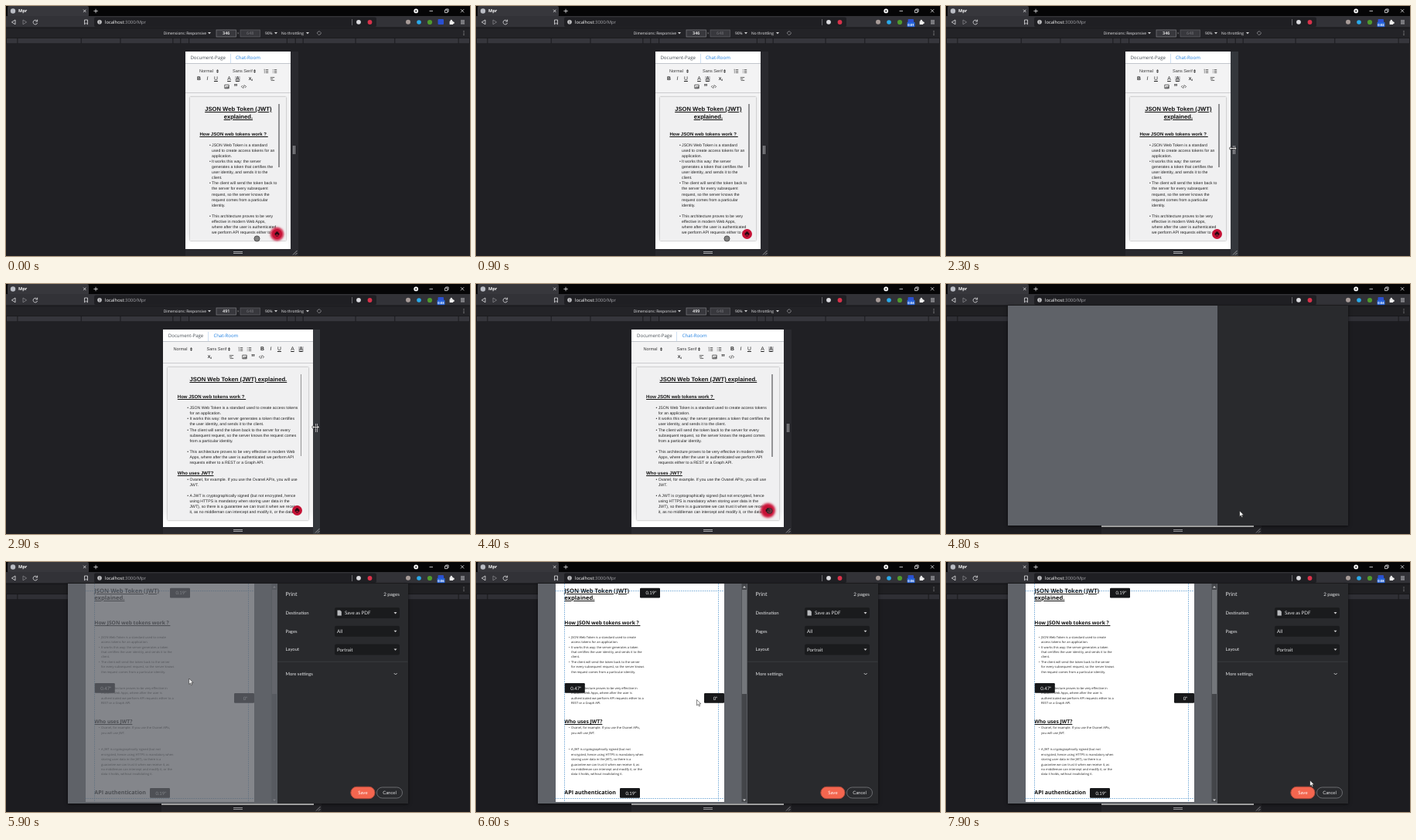
These frames come from a looping animation (600x324 px, 8000 ms). An HTML page:

```html
<!DOCTYPE html>
<html lang="en">
<head>
<meta charset="utf-8">
<title>Document editor</title>
<style>
html, body { margin: 0; width: 100%; height: 100%; overflow: hidden; background: #202024; }
#stage { position: relative; width: 600px; height: 324px; overflow: hidden; background: #202024;
  font-family: "Open Sans", sans-serif; text-rendering: geometricPrecision; }
#stage > *, .layer { position: absolute; left: 0; top: 0; }
svg { display: block; overflow: visible; }
.line { fill: none; stroke: #e4e4e6; stroke-width: .8; }

#device { --p: 0; top: 59px; height: 255.5px; width: calc(136.5px + 60.6px * var(--p));
  left: calc(231.7px - 30.3px * var(--p)); background: linear-gradient(#f3f3f4 92%, #fff 98%);
  display: flex; flex-direction: column; box-sizing: border-box;
  padding-bottom: calc(10.5px - 2px * var(--p)); }
.tabs { height: 16px; flex: none; background: #fff; border-bottom: .8px solid #c2c6cc; box-sizing: border-box;
  font-size: 6.1px; line-height: 16px; position: relative; color: #495057; }
.tabs span { position: absolute; left: 6.7px; }
.tabs span + span { left: 65.3px; color: #1f7fe0; }
.tabs i { position: absolute; left: 58px; top: 3px; height: 12px; width: .7px; background: #cfe0f3; }
.tools { flex: none; display: flex; flex-wrap: wrap; justify-content: center; padding: 4.6px 0 2px;
  border-bottom: .8px solid #cbcbce; font: 5.6px/10px "Liberation Sans", Arial, sans-serif; color: #3a3a3a; }
.group { display: flex; margin-right: 6px; }
.group > * { width: 11px; height: 10px; display: flex; align-items: center; justify-content: center; }
.group.pick { margin: 0; }
.pick > * { width: 41.5px; padding-left: 3px; box-sizing: border-box; justify-content: flex-start; position: relative; }
.pick > :first-child { width: 49.5px; padding-left: 9.5px; }
.pick svg { position: absolute; right: 7px; }
.pick > :first-child svg { right: 14px; }
.group svg { width: 7px; height: 7px; fill: none; stroke: #333; stroke-width: 1.9; }
.group b, .group em, .group u { font-size: 6.8px; color: #222; }
.group .sub { font-size: 5.4px; }
.sub small { font-size: 3.4px; margin-top: 3px; }
.group .mark { background: #c9c9cb; width: 7px; height: 7px; margin: 1.5px 2px; }
.group .quote { font-size: 10px; padding-top: 3px; height: 7px; }
.editor { flex: 1; min-height: 0; margin: 5.1px 6.2px 0; position: relative; background: #f0f0f1;
  box-shadow: 0 0 2px .3px rgba(0,0,0,.45); }
.clip { position: absolute; inset: 0 0 7.5px; overflow: hidden; }
.flow { padding: 11.4px 11.7px 0 12.5px; font: 5.17px/7.1px "Liberation Sans", Arial, sans-serif; color: #222; }
.flow > * { position: relative; }
.flow .h1 { font-size: 7.65px; line-height: 9.5px; text-align: center; }
.flow .h2, .flow .h3 { font-size: 6.05px; line-height: 7.5px; }
.flow .li { margin-left: 15.7px; }
.h1, .h2, .h3 { font-weight: bold; color: #111; }
.h1, .h2 { text-decoration: underline .6px; text-underline-offset: .8px; }
.li::before { content: "•"; position: absolute; left: -3.2px; }
.thumb { position: absolute; right: 8.4px; top: 9.8px; width: 1.5px; background: #939395;
  height: calc(82px + 25px * var(--p)); }
#fab { position: absolute; width: 13px; height: 13px; border-radius: 50%; background: #c51236;
  right: calc(11.6px + 2.5px * var(--p)); bottom: calc(12.8px + 2px * var(--p)); }
#fab svg { width: 13px; height: 13px; }
.grip { position: absolute; background: #29292e; }
.grip i { position: absolute; background: #a9a9ad; }
.side { left: 100%; top: 0; width: 9.5px; bottom: -9.5px; }
.side.hover { background: #34373c; }
.foot { left: 0; right: 0; top: 100%; height: 9.5px; }

#shade { top: 27px; width: 600px; height: 297px; background: rgba(0,0,0,.12); }
#flash { width: 600px; height: 324px; background: #fcfcfc; transform-origin: 300px 170px;
  clip-path: polygon(80.5px 26px, 519.5px 26px, 523px 317px, 77px 317px); }
#dialog { width: 600px; height: 324px; font-family: Lato, sans-serif; }
#dialog .box { left: 80px; top: 28px; width: 439.5px; height: 285px; box-shadow: 0 1px 4px rgba(0,0,0,.6);
  background: linear-gradient(90deg, #5f6268 270.5px, #292a2d 270.5px); }
#preview { width: 600px; height: 324px; clip-path: inset(28px 249.5px 13px 80px); }
.page { left: 102.5px; top: 28px; width: 218.5px; height: 283px; background: #fff; }
.sheet { font: 4.03px/6.45px "Open Sans", sans-serif; color: #222; white-space: nowrap; }
.sheet > * { position: absolute; left: 114.3px; }
.sheet .h1 { font-size: 7.58px; line-height: 9px; }
.sheet .h2 { font-size: 6.65px; line-height: 8px; }
.sheet .h3 { font-size: 7.1px; line-height: 8px; }
.sheet .li { left: 123px; }
</style>
</head>
<body>
<div id="stage">
  <svg id="chrome" width="600" height="324" font-size="5.87"></svg>
  <div id="device">
    <div class="tabs"><span>Document-Page</span><span>Chat-Room</span><i></i></div>
    <div class="tools" id="tools"></div>
    <div class="editor"><div class="clip"><div class="flow" id="flow"></div></div><div class="thumb"></div></div>
    <div id="fab"><svg viewBox="-6.5 -6.5 13 13"><path d="M-1.6-3h3.2v1.6h1.2v3h-1.2v1.4h-3.2V1.6h-1.2v-3h1.2zM-1 .6h2v1.6h-2z" fill="#2a0a12" fill-rule="evenodd"/></svg></div>
    <div class="grip side" id="side"><i style="left:3.3px;top:122px;width:1px;height:11px"></i><i style="left:5.3px;top:122px;width:1px;height:11px"></i>
      <svg class="layer" style="top:257.5px;left:3px" width="6" height="6"><path d="M0 5.5L5.5 0M3 5.5L5.5 3" stroke="#b5b5b8" stroke-width=".8"/></svg></div>
    <div class="grip foot"><i style="left:50%;margin-left:-6px;top:3.8px;width:12px;height:1px"></i><i style="left:50%;margin-left:-6px;top:5.8px;width:12px;height:1px"></i></div>
  </div>
  <div id="shade"></div>
  <div id="flash"></div>
  <div id="dialog">
    <div class="layer box"></div>
    <div class="layer" id="preview">
      <div class="layer page"></div>
      <div class="layer sheet" id="sheet"></div>
      <svg class="layer" id="marks" width="600" height="324"></svg>
    </div>
    <svg class="layer" id="panel" width="600" height="324" font-size="5.9" fill="#e3e4e6"></svg>
  </div>
  <svg id="cursor" width="1" height="1">
    <circle id="touch" r="3.6" fill="rgba(70,70,70,.65)" stroke="rgba(35,35,35,.75)" stroke-width=".8"/>
    <g id="resize" fill="none" stroke-linejoin="round">
      <path d="M-4 0H4M-2.6-1.4L-4 0l1.4 1.4M2.6-1.4L4 0 2.6 1.4" stroke="#111" stroke-width="1.8"/>
      <path d="M-4 0H4M-2.6-1.4L-4 0l1.4 1.4M2.6-1.4L4 0 2.6 1.4" stroke="#fff" stroke-width=".9"/>
    </g>
    <path id="arrow" d="M0 0v7.4l1.7-1.5 1.2 2.6 1.2-.5-1.2-2.6h2.4z" fill="#fff" stroke="#111" stroke-width=".5"/>
  </svg>
</div>
<script>
const $ = id => document.getElementById(id);
const text = (x, y, s, attrs = '') => `<text x="${x}" y="${y}" ${attrs}>${s}</text>`;
const rect = (x, y, w, h, fill, attrs = '') => `<rect x="${x}" y="${y}" width="${w}" height="${h}" fill="${fill}" ${attrs}/>`;
const dot = (x, y, r, fill) => `<circle cx="${x}" cy="${y}" r="${r}" fill="${fill}"/>`;
const line = (d, attrs = '') => `<path class="line" d="${d}" ${attrs}/>`;
const down = (x, y) => `<path d="M${x - 2} ${y - 1}h4l-2 2.4z" fill="#d0d0d2"/>`;

// Browser window, toolbar and device bar
const breakpoints = [320, 375, 425, 768, 1024, 1440].map(w => w * .198);
const sizeBox = (x, border) => rect(x, 31, 25.5, 9, '#38383d', `stroke="${border}" stroke-width=".7"`);
$('chrome').innerHTML =
  rect(0, 0, 600, 13, '#050506') + rect(2, 0, 105, 14, '#37373c', 'rx="2"') +
  rect(0, 13, 600, 14.5, '#323237') + rect(114, 14.5, 365, 12.5, '#1f1f23', 'rx="2"') +
  dot(9, 6.5, 3.2, '#b9bcc4') + text(16, 8.4, 'Mpr', 'fill="#fff" font-weight="700" font-size="5.5"') +
  line('M100 4.7l3.4 3.4m0-3.4l-3.4 3.4M113.4 6.5h5.4M116.1 3.8v5.4') +
  dot(530.2, 6.4, 2.9, '#f4f4f4') + dot(530.2, 6.4, 1, '#111') +
  line('M547.5 6.5h4.5M567.5 5.2h3.4v3.4h-3.4zM568.7 5v-1h3.4v3.4h-1M588 4.2l4.2 4.2m0-4.2L588 8.4') +
  line('M12 18l-4.6 2.9 4.6 2.9z') + line('M22 18l4.6 2.9-4.6 2.9z', 'style="stroke:#85858a"') +
  line('M40.3 19.6a2.8 2.8 0 1 0 .3 2.3M40.6 17.6v2.4h-2.4') + line('M101.5 18h4v5.8l-2-1.7-2 1.7z') +
  dot(121, 20.8, 2.8, '#c6c6c9') + rect(120.6, 19, .8, 1, '#222') + rect(120.6, 20.6, .8, 1.9, '#222') +
  text(128, 22.8, '<tspan fill="#fff">localhost</tspan>:3000/Mpr', 'fill="#a6a6ab"') +
  rect(447, 17, .8, 8, '#77777c') + dot(456, 20.8, 2.9, '#dcdce0') + dot(470.5, 21, 2.9, '#d8324a') +
  dot(520, 20.8, 3, '#a79b98') + dot(534, 21, 2.8, '#2aa9ea') + dot(548, 21, 3.1, '#4f9a2d') +
  rect(558.5, 17, 7.5, 7, '#2a4fd0', 'rx="1"') +
  '<g id="badge">' + rect(557.5, 20.8, 10, 6.5, '#2563d8', 'rx="1"') +
  text(562.5, 25.8, '', 'id="clock" fill="#fff" font-size="4.2" font-weight="700" text-anchor="middle"') + '</g>' +
  rect(573.6, 19.5, 4.6, 4.6, '#eee', 'rx=".5"') + dot(575.8, 19, 1.2, '#eee') + dot(578.6, 21.8, 1.2, '#eee') +
  line('M588 18.9h5M588 20.9h5M588 22.9h5') +
  rect(0, 27.5, 600, 2, '#1d1d20') + rect(0, 29.5, 600, 11.5, '#232327') +
  '<g fill="#f2f2f4" font-size="4.88">' +
  text(203.8, 37, 'Dimensions: Responsive') + text(335, 37, '90%') + text(356, 37, 'No throttling') +
  sizeBox(272, '#7b7b80') + text(284.7, 37.2, '346', 'id="size" fill="#fff" font-weight="600" text-anchor="middle" font-size="5.4"') +
  sizeBox(303, '#5c5c61') + text(315.7, 37.2, '648', 'fill="#77777c" text-anchor="middle" font-size="5.4"') +
  text(298.8, 37, '×', 'fill="#999"') + '</g>' + down(263, 35) + down(349, 35) + down(390, 35) +
  line('M402.6 36a2.4 2.4 0 0 1 4-2.4M407.2 34.2a2.4 2.4 0 0 1-4 2.4', 'style="stroke:#98989c"') +
  [32.8, 35, 37.2].map(y => dot(592, y, .6, '#bbb')).join('') +
  rect(0, 41, 600, 8, '#1b1b1e') + rect(1, 42, 598, 6.3, '#36363c') +
  breakpoints.map(w => rect(299.5 - w, 41.5, 1, 7, '#1b1b1e') + rect(299.5 + w, 41.5, 1, 7, '#1b1b1e')).join('');

// Editor toolbar: groups wrap as the page gets narrower
const icon = d => `<span><svg viewBox="0 0 18 18"><path d="${d}"/></svg></span>`;
const pick = s => `<span>${s}<svg viewBox="0 0 18 18" style="width:5px"><path d="M5 7l4-5 4 5zM5 11l4 5 4-5z" fill="#333"/></svg></span>`;
const group = (s, name = '') => `<div class="group ${name}">${s}</div>`;
const rows = 'M7 4h9M7 9h9M7 14h9';
$('tools').innerHTML =
  group(pick('Normal') + pick('Sans Serif'), 'pick') +
  group(icon(rows + 'M3 2v4M2 9h3M2 14h3') + icon(rows + 'M2 4h2M2 9h2M2 14h2')) +
  group('<b>B</b><em>I</em><u>U</u>') +
  group('<u>A</u><u class="mark">A</u>') +
  group('<b class="sub">X<small>2</small></b><span></span>') +
  group(icon('M2 4h14M2 9h9M4 14h12')) +
  group(icon('M2 3h14v12H2zM4 13l4-4 3 2 3-3v5z') + '<b class="quote">”</b>' + icon('M5 5L1 9l4 4M13 5l4 4-4 4M11 3L7 15'));

// Document: kind, gap above in the editor, top on the printed page, text ("|" is a printed line end)
const doc = [
  ['h1', 0, 33.6, 'JSON Web Token (JWT)|explained.'],
  ['h2', 15.6, 75, 'How JSON web tokens work ?&nbsp;'],
  ['li', 6.5, 95.8, 'JSON Web Token is a standard used to create|access tokens for an application.'],
  ['li', 0, 108.5, 'It works this way: the server generates a token|that certifies the user identity, and sends it to the|client.'],
  ['li', 0, 127.8, 'The client will send the token back to the server|for every subsequent request, so the server knows|the request comes from a particular identity.'],
  ['li', 7.1, 162, 'This architecture proves to be very effective in|modern Web Apps, where after the user is|authenticated we perform API requests either to a|REST or a Graph API.'],
  ['h2', 7.1, 203.2, 'Who uses JWT?'],
  ['li', 0, 213.3, 'Ovanel, for example. If you use the Ovanel APIs,|you will use JWT.'],
  ['li', 7.1, 241.2, 'A JWT is cryptographically signed (but not|encrypted, hence using HTTPS is mandatory when|storing user data in the JWT),&nbsp;so there is a|guarantee we can trust it when we receive it, as|no middleman can intercept and modify it, or the|data it holds, without invalidating it.'],
  ['h3', 7.1, 295.3, 'API authentication']
];
$('flow').innerHTML = doc.map(([kind, gap, , s]) => `<div class="${kind}" style="margin-top:${gap}px">${s.replaceAll('|', ' ')}</div>`).join('');
$('sheet').innerHTML = doc.map(([kind, , y, s]) => `<div class="${kind}" style="top:${y}px">${s.replaceAll('|', '<br>')}</div>`).join('');

// Print preview margins and scrollbar
const label = (x, y, s) => rect(x, y, 26, 12.8, '#17181a', 'rx="1.2"') +
  text(x + 14.5, y + 8.6, s, 'fill="#f4f4f4" font-size="6" text-anchor="middle"');
$('marks').innerHTML =
  '<path d="M114.5 28V311M313.5 28V311M102.5 37.5H321M102.5 306.5H321" stroke="#5b9bd0" stroke-width=".8" stroke-dasharray="1.6 1.2"/>' +
  label(212, 33.7, '0.19"') + label(114.8, 157, '0.47"') + label(295, 170, '0"') + label(186, 293, '0.19"') +
  rect(343.5, 28, 7, 285, '#44464a') + rect(344, 36, 6, 135, '#74777b') +
  '<path d="M345 33.5h4l-2-2.5zM345 307.5h4l-2 2.5z" fill="#d0d0d2"/>';

// Print settings
const field = (y, name, value, x) => text(361.5, y + 2, name) + rect(425, y - 7, 84, 14, '#1a1b1d', 'rx="2"') +
  text(x, y + 2.1, value, 'font-size="6.2"') + down(503.5, y);
$('panel').innerHTML =
  text(361.5, 44.2, 'Print', 'font-size="7.1"') + text(509, 44, '2 pages', 'font-size="6.2" text-anchor="end"') +
  field(66, 'Destination', 'Save as PDF', 438) + field(89.7, 'Pages', 'All', 428) + field(113.4, 'Layout', 'Portrait', 428) +
  '<path d="M428.5 62.5h3.5l1.8 1.8v5.2h-5.3z" fill="#b8babd"/>' +
  rect(351, 128.8, 168.5, .7, '#414347') + text(361.5, 147, 'More settings') + line('M501.7 144l2 2 2-2') +
  rect(445.8, 291.3, 31.2, 15.4, '#f4664f', 'rx="7.7" stroke="#a9483a" stroke-width="1"') +
  text(461.4, 301.2, 'Save', 'fill="#fff" font-size="6" text-anchor="middle"') +
  rect(479.5, 292, 33, 14, 'none', 'rx="7" stroke="#85878b" stroke-width=".7"') +
  text(496, 301.2, 'Cancel', 'font-size="6" text-anchor="middle"');

const LOOP = 8000, STEP = 100;
const ramp = (t, a, b) => Math.min(1, Math.max(0, (t - a) / (b - a)));
const ease = k => k * k * (3 - 2 * k);
const show = (id, on) => { $(id).style.visibility = on ? 'visible' : 'hidden'; };

// Pointer path: time, x, y
const path = [[1400, 324.5, 301.5], [2000, 371, 184.5], [2300, 371, 184.5], [3000, 402, 185.5], [3600, 378.5, 293.5],
  [4500, 379.7, 294], [5000, 379.7, 294], [5900, 236.7, 151], [6100, 236.7, 151], [7800, 470.7, 283]];
function pointer(t) {
  const i = path.findIndex(k => k[0] > t);
  if (i < 1) return path[i ? path.length - 1 : 0].slice(1);
  const [a, b] = [path[i - 1], path[i]], k = ease(ramp(t, a[0], b[0]));
  return [a[1] + (b[1] - a[1]) * k, a[2] + (b[2] - a[2]) * k];
}

function draw(t) {
  const p = ease(ramp(t, 2300, 3000));
  $('device').style.setProperty('--p', p);
  $('size').textContent = Math.round(346 + 153 * p);

  const glow = t < 500 ? 1 : t < 900 ? .6 - .35 * (t >= 600) : t >= 3500 ? 1.25 : 0;
  $('fab').style.boxShadow = glow ? `0 0 ${2.4 * glow}px ${2.4 * glow}px rgba(205,20,58,${Math.min(1, .85 * glow)})` : 'none';

  const secs = Math.floor((t + 100) / 1000);
  show('badge', secs > 0);
  $('clock').textContent = secs ? '0:0' + secs : '';

  const flashing = t >= 4500 && t < 4800;
  show('flash', flashing);
  $('flash').style.opacity = t < 4600 ? .55 : .985;
  $('flash').style.transform = t < 4600 ? 'scale(.96)' : 'none';
  show('shade', t >= 4500);
  show('dialog', t >= 4800);
  show('panel', t >= 4900);
  show('preview', t >= 5800);
  $('preview').style.opacity = t < 5900 ? .08 : .23 + .77 * ramp(t, 5900, 6300);

  const [x, y] = pointer(t);
  const kind = t >= 4500 ? 'arrow' : t >= 1900 && t < 3200 ? 'resize' : 'touch';
  for (const id of ['touch', 'resize', 'arrow']) $(id).style.display = id === kind ? '' : 'none';
  $('side').classList.toggle('hover', kind === 'resize');
  $('cursor').style.transform = `translate(${x}px, ${y}px)`;
}

function tick() {
  draw(Math.floor(performance.now() % LOOP / STEP) * STEP);
  requestAnimationFrame(tick);
}
tick();
</script>
</body>
</html>
```
